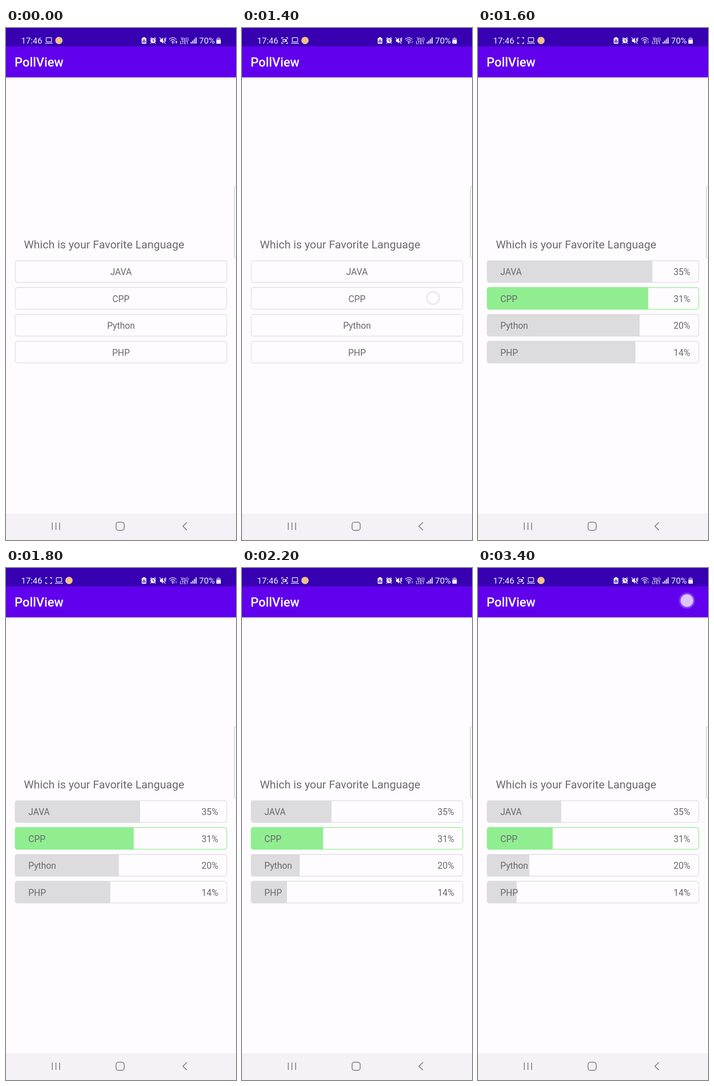
An HTML page that plays this animation: 502x1115 px, repeating every 3.5 s.

```html
<!DOCTYPE html>
<html lang="en">
<head>
<meta charset="utf-8">
<title>Poll</title>
<style>
html, body { margin: 0; width: 100%; height: 100%; overflow: hidden; background: #fefcff; }
svg { display: block; width: 502px; height: 1115px; font-family: Roboto, sans-serif; }
.opt { font-size: 19.5px; fill: #69686c; }
.line { fill: none; stroke: #f4f0ff; stroke-width: 1.4; }
.nav { fill: none; stroke: #89878b; stroke-width: 2; }
</style>
</head>
<body>
<svg viewBox="0 0 502 1115">
  <defs>
    <linearGradient id="shade" x2="0" y2="1">
      <stop stop-color="#000" stop-opacity=".1"/>
      <stop offset="1" stop-color="#000" stop-opacity="0"/>
    </linearGradient>
    <radialGradient id="glow">
      <stop offset=".7" stop-color="#fff" stop-opacity=".4"/>
      <stop offset="1" stop-color="#fff" stop-opacity="0"/>
    </radialGradient>
  </defs>
  <rect width="502" height="1115" fill="#fefcff"/>
  <rect y="107.5" width="502" height="4" fill="url(#shade)"/>
  <rect y="39" width="502" height="68.5" fill="#6100ed"/>
  <rect width="502" height="40" fill="#3700b0"/>
  <text x="18.7" y="84" font-size="27.4" font-weight="500" fill="#fff">PollView</text>

  <!-- status bar, left -->
  <g fill="#f4f0ff">
    <text x="33" y="34" font-size="18.5">17:46</text>
    <g id="rec">
      <path class="line" d="M86.7 24v-3.3h3.5M96 20.700h3.500V24M99.500 30.500v3.300H96M90.200 33.800h-3.500v-3.300"/>
      <path id="cam" class="line" stroke-width="1.2" d="M89.500 24.700h5v5.300h-5zM94.500 27l2.600-2v4.600l-2.600-2"/>
    </g>
    <g id="apps">
      <rect class="line" x="87.700" y="21" width="11.800" height="9.300" rx="1"/>
      <path class="line" d="M85 33.300h17" stroke-width="1.800"/>
      <circle cx="115.500" cy="27.200" r="8" fill="#efc08a"/>
    </g>

    <!-- status bar, right -->
    <path d="M299 20h4.500v1.700h1.500q1.300 0 1.300 1.300v10q0 1.300-1.300 1.300h-7.500q-1.300 0-1.300-1.300V23q0-1.300 1.300-1.300h1.500z"/>
    <path d="M301.200 25.200l3 5.300h-6z" fill="none" stroke="#3700b0" stroke-width="1.300"/>
    <circle cx="321" cy="27.500" r="5.700"/>
    <path class="line" d="M314.800 23.500l3.200-3M327.200 23.500l-3.200-3M317 32l-1.500 2M325 32l1.500 2" stroke-width="2"/>
    <path d="M321 24v3.700l2.500 1.800" fill="none" stroke="#3700b0" stroke-width="1.400"/>
    <path d="M336 25h2.700l4-4.200V34l-4-4H336z"/>
    <path class="line" d="M335 20.500l13 13.500M345 22l2 1.800-1.500 2 1.800 2-1.500 2.200M348 20.500l1 3-1.500 3 1.500 3" stroke-width="1.300"/>
    <path class="line" stroke-width="1.700" d="M356 24.500q8-7 16 0M358.700 27.500q5.300-4.500 10.600 0M361.300 30.300q2.700-2.200 5.400 0"/>
    <circle cx="364" cy="32.500" r="1.500"/>
    <path id="up" d="M372 27.500l2.300 3h-1.500v3.300h-1.600v-3.300h-1.500z"/>
    <path d="M368.300 34l-2-2.700h1.300v-2.500h1.400v2.500h1.300z" opacity=".4"/>
    <text x="381.500" y="26.500" font-size="9" font-weight="500">Vo))</text>
    <text x="379.500" y="34.500" font-size="8.500" font-weight="500">LTE1</text>
    <path d="M403 30.500h2.200V34H403zM406.600 27.500h2.200V34h-2.200zM410.200 24h2.200v10h-2.200zM413.800 20.500h2.200V34h-2.200z"/>
    <text x="421.500" y="34" font-size="18.500">70%</text>
    <path d="M461.800 20.300h4.400v1.700h1.400q1.300 0 1.300 1.300V26h-9.800v-2.700q0-1.300 1.300-1.300h1.400z" opacity=".5"/>
    <path d="M459.100 26h9.800v6.700q0 1.500-1.500 1.500h-6.800q-1.500 0-1.500-1.500z"/>
  </g>

  <rect x="498.500" y="344" width="12" height="158" rx="5" fill="#fff" stroke="#aaa9ab"/>
  <text x="39" y="479.500" font-size="24.360" fill="#6b6a6e">Which is your Favorite Language</text>
  <g id="poll"></g>

  <!-- navigation bar -->
  <rect y="1057" width="502" height="58" fill="#f4f2f6"/>
  <path class="nav" d="M101 1077v16M109 1077v16M117 1077v16"/>
  <rect class="nav" x="240.300" y="1076.300" width="17.600" height="17.600" rx="5"/>
  <path class="nav" d="M395 1076.500l-9 8.500 9 8.500"/>

  <g id="tap">
    <circle r="19" fill="url(#glow)"/>
    <circle id="dot" r="13.500" stroke-width="2"/>
  </g>
</svg>
<script>
const LOOP = 3500, STEP = 100, LEFT = 19.5, WIDTH = 463;
const VOTE = 1500, START = 1410, SPAN = 970;
const GRAY = '#dcdcde', GREEN = '#90ee90';
const $ = id => document.getElementById(id);
const show = (el, on) => el.setAttribute('visibility', on ? 'visible' : 'hidden');

function add(tag, attrs, text = '') {
  const el = document.createElementNS('http://www.w3.org/2000/svg', tag);
  for (const k in attrs) el.setAttribute(k, attrs[k]);
  el.textContent = text;
  return $('poll').appendChild(el);
}

const rows = [['JAVA', 35], ['CPP', 31], ['Python', 20], ['PHP', 14]].map(([name, share], i) => {
  const y = 506 + i * 58.5, color = name === 'CPP' ? GREEN : GRAY;
  return {
    y, share, color,
    frame: add('rect', { x: LEFT + .7, y: y + .7, width: WIDTH - 1.4, height: 47.3, rx: 5, fill: 'none', 'stroke-width': 1.4 }),
    fill: add('path', { fill: color }),
    label: add('text', { class: 'opt', y: y + 32 }, name),
    pct: add('text', { class: 'opt', x: 463, y: y + 32, 'text-anchor': 'end' }, share + '%')
  };
});

function drawPoll(t) {
  const voted = t >= VOTE;
  const rest = t <= VOTE ? 1 : Math.max(0, 1 - (t - START) / SPAN) ** 2;
  for (const r of rows) {
    const level = r.share + Math.ceil((100 - r.share) * rest);
    const right = LEFT + WIDTH * level / 100;
    r.frame.setAttribute('stroke', voted ? r.color : GRAY);
    r.fill.setAttribute('d', `M${right} ${r.y}V${r.y + 48.7}H${LEFT + 5}q-5 0-5-5V${r.y + 5}q0-5 5-5z`);
    r.label.setAttribute('x', voted ? 48.7 : 251);
    r.label.setAttribute('text-anchor', voted ? 'start' : 'middle');
    show(r.fill, voted);
    show(r.pct, voted);
  }
}

function drawTap(t) {
  const press = t === 1400, fade = t === 1500, top = t === 3400;
  show($('tap'), press || fade || top);
  $('tap').setAttribute('transform', top ? 'translate(456 71)' : 'translate(417 588)');
  $('tap').firstElementChild.setAttribute('opacity', top ? 1 : 0);
  $('dot').setAttribute('fill', fade ? '#b4d4b6' : '#fff');
  $('dot').setAttribute('stroke', press ? '#dddce0' : 'none');
  $('dot').setAttribute('opacity', press ? 1 : fade ? .55 : .62);
}

function draw(now) {
  const t = Math.floor(now % LOOP / STEP) * STEP;
  const slide = 1 - (1 - Math.min(1, t / 300)) ** 2;
  $('apps').setAttribute('transform', `translate(${22 * slide} 0)`);
  $('rec').setAttribute('opacity', slide);
  $('cam').setAttribute('opacity', (t + 400) % 1000 < 500 ? 0 : 1);
  $('up').setAttribute('opacity', t < 1100 ? 1 : .4);
  drawPoll(t);
  drawTap(t);
}

const begin = performance.now();
function tick() {
  draw(performance.now() - begin);
  requestAnimationFrame(tick);
}
tick();
</script>
</body>
</html>
```
